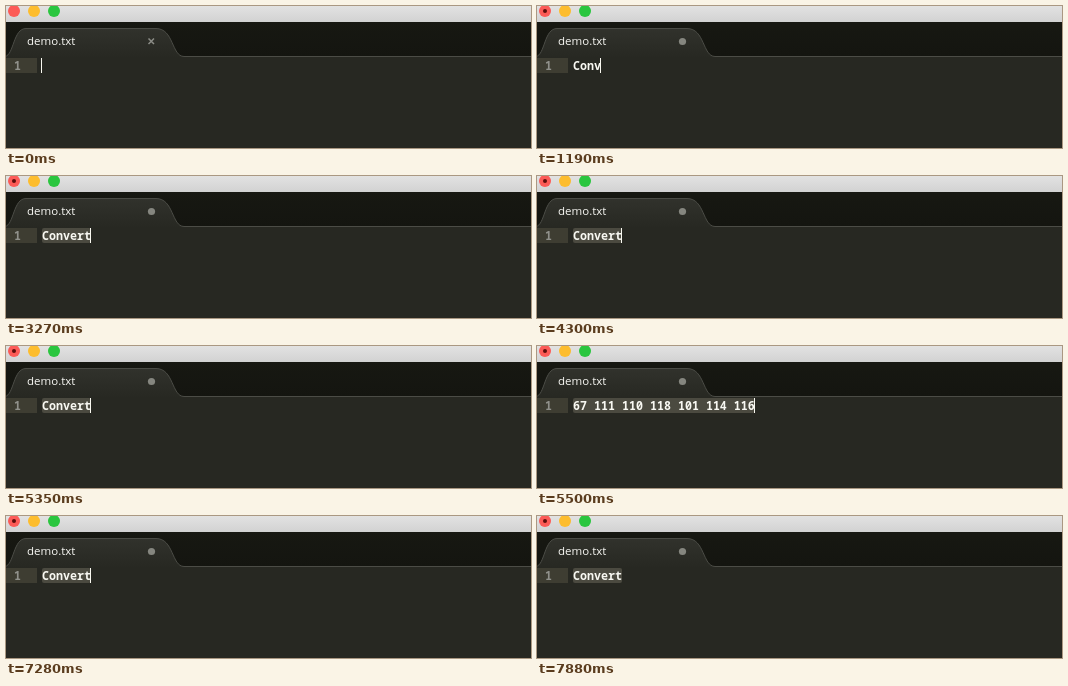
An HTML page that plays this animation: 525 by 142 pixels, repeating every 8 s.

```html
<!DOCTYPE html>
<html lang="en">
<head>
<meta charset="utf-8">
<title>Convert text to character codes</title>
<style>
  html, body { margin: 0; width: 100%; height: 100%; overflow: hidden; background: #272822; }
  svg { display: block; }
  .tab { font: 500 11.5px "Open Sans", "Noto Sans", sans-serif; fill: #f8f8f4; }
  .code { font: 600 11.67px "Noto Sans Mono", monospace; fill: #f8f8f2; white-space: pre; }
  .code.line { fill: #90918b; }
</style>
</head>
<body>
<svg width="525" height="142" viewBox="0 0 525 142">
  <defs>
    <linearGradient id="title" x2="0" y2="1">
      <stop stop-color="#e2e2e2"/><stop offset="1" stop-color="#d2d2d2"/>
    </linearGradient>
    <linearGradient id="strip" x2="0" y2="1">
      <stop stop-color="#171812"/><stop offset="1" stop-color="#141510"/>
    </linearGradient>
    <linearGradient id="sheet" x2="0" y2="1">
      <stop stop-color="#31322c"/><stop offset="1" stop-color="#272822"/>
    </linearGradient>
  </defs>
  <rect width="525" height="142" fill="#272822"/>
  <rect width="525" height="16" fill="url(#title)"/>
  <circle cx="8" cy="5" r="6" fill="#fc5b57"/>
  <circle cx="28" cy="5" r="6" fill="#fdbd2e"/>
  <circle cx="48" cy="5" r="6" fill="#2ac63f"/>
  <rect y="16" width="525" height="35" fill="url(#strip)"/>
  <path d="M-1 50.5C8 49 7 22.5 20 22.5H150C168 22.5 165.5 50.5 178 50.5H526V52H-1Z" fill="url(#sheet)"/>
  <path d="M-1 50.5C8 49 7 22.5 20 22.5H150C168 22.5 165.5 50.5 178 50.5H526" fill="none" stroke="#4b4c46"/>
  <text class="tab" x="21" y="39">demo.txt</text>
  <path id="close" d="M142.5 32.5l5.5 5.5m0-5.5l-5.5 5.5" stroke="#8c8d87" stroke-width="1.5"/>
  <g id="dirty">
    <circle cx="8" cy="5" r="2" fill="#5c0d0b"/>
    <circle cx="145.5" cy="35.5" r="3.6" fill="#85867f"/>
  </g>
  <rect y="52" width="31" height="15" fill="#3e3d32"/>
  <text class="code line" x="8" y="64">1</text>
  <rect id="selection" x="36" y="52" height="15" rx="2" fill="#4b4a40"/>
  <text id="text" class="code" x="36" y="64"></text>
  <rect id="caret" y="52" width="1" height="15" fill="#f8f8f0"/>
</svg>
<script>
const LOOP = 8000, STEP = 148.2, CHAR = 7;
const word = "Convert";
const codes = [...word].map(c => c.charCodeAt(0)).join(" ");

// Moments of the edits, counted in steps
const keys = [1, 4, 5, 8, 10, 12, 14];
const select = 21, encode = 37, decode = 49;
const edits = [0, ...keys, encode, decode];

const $ = id => document.getElementById(id);
const show = (id, on) => $(id).setAttribute("visibility", on ? "visible" : "hidden");

// The caret pulses softly, starting afresh at every edit
function caretOpacity(step) {
  const since = (step - edits.findLast(e => e <= step)) * STEP;
  const wave = Math.cos((since - 150) / 1050 * 2 * Math.PI);
  return Math.min(1, Math.max(0, .5 + .8 * wave));
}

function draw(t) {
  const step = Math.floor(t / STEP);
  const typed = keys.filter(k => k <= step).length;
  const line = step >= encode && step < decode ? codes : word.slice(0, typed);
  const width = line.length * CHAR;
  $("text").textContent = line;
  show("close", !typed);
  show("dirty", typed);
  show("selection", step >= select);
  $("selection").setAttribute("width", width);
  $("caret").setAttribute("x", 35 + width);
  $("caret").setAttribute("opacity", caretOpacity(step));
}

const start = performance.now();
function tick() {
  draw((performance.now() - start) % LOOP);
  requestAnimationFrame(tick);
}
tick();
</script>
</body>
</html>
```
